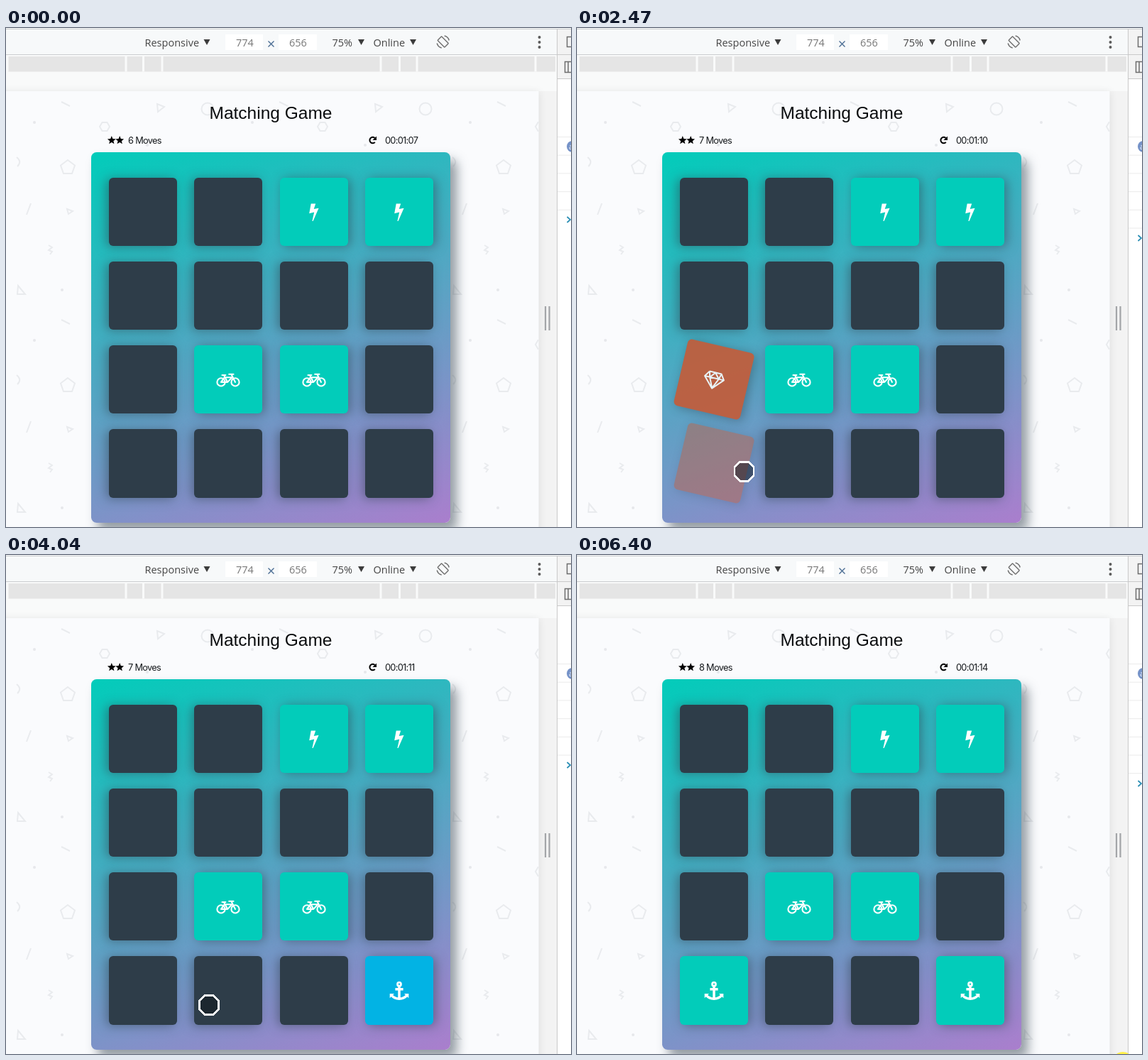
An HTML page for the animation above (6480 ms loop, 796 by 703 pixels).

```html
<!DOCTYPE html>
<html lang="en">
<head>
<meta charset="utf-8">
<title>Matching Game</title>
<style>
  html, body { margin: 0; width: 100%; height: 100%; overflow: hidden; background: #f9fafa; }
  #stage { position: relative; width: 796px; height: 703px; overflow: hidden; }
  svg { position: absolute; left: 0; top: 0; overflow: visible; }
  #stage > svg { overflow: hidden; }
  .ui { font: 14.5px "Open Sans", "Noto Sans", sans-serif; fill: #454545; }
  .ui .size { fill: #777; }
  .title { font: 24.5px "Liberation Sans", Arial, sans-serif; fill: #0a0c0e; }
  .score { font: 12.8px Inter, Roboto, sans-serif; letter-spacing: -.7px; fill: #15191c; }
  #deck {
    position: absolute; left: 120px; top: 175px; width: 506px; height: 521.5px; border-radius: 7.7px;
    background: linear-gradient(160deg, #02ccba 0%, #aa7ecd 100%);
    box-shadow: 9.2px 11.5px 15.3px rgba(46, 61, 73, .5);
  }
  /* Face-down cards are turned round, so their shadow falls to the left. */
  .card {
    position: absolute; width: 96.3px; height: 96.3px; border-radius: 6px;
    box-shadow: -3.8px 1.5px 15.3px rgba(46, 61, 73, .5);
  }
  .card.open { box-shadow: 3.8px 1.5px 15.3px rgba(46, 61, 73, .5); }
  .card svg { left: 48px; top: 49px; width: 1px; height: 1px; fill: none; stroke: #fff; display: none; }
  .card.open svg { display: block; }
</style>
</head>
<body>
<div id="stage">
  <svg width="796" height="703">
    <defs>
      <pattern id="doodles" x="0" y="89" width="307" height="307" patternUnits="userSpaceOnUse">
        <g fill="none" stroke="#e9ebee" stroke-width="2">
          <path d="M78 15L90 21M29 174L35 158M213 18L223 22L214 29ZM86 166L94 169L88 173ZM17 274L27 286L16 286ZM15 93Q23 99 16 106M60 217L65 220L60 224L65 226L62 230"/>
          <circle cx="284" cy="25" r="8.5"/>
          <path d="M135.5 44H142.5L146 50L142.5 56H135.5L132 50Z"/>
          <path d="M87 97L97 104.5L93 116H81L77 104.5Z"/>
        </g>
        <g fill="#e6e8eb">
          <circle cx="40" cy="44" r="2"/><circle cx="79" cy="280" r="2"/><circle cx="199" cy="76" r="2"/>
        </g>
      </pattern>
      <filter id="soft" x="-5%" y="-5%" width="110%" height="110%"><feGaussianBlur stdDeviation="6"/></filter>
    </defs>

    <rect x="750" y="89" width="27" height="614" fill="#f3f3f3"/>
    <rect x="-20" y="90" width="771" height="640" opacity=".09" filter="url(#soft)"/>
    <rect y="89" width="750.5" height="614" fill="#fafbfd"/>
    <rect y="89" width="750.5" height="614" fill="url(#doodles)"/>

    <rect width="796" height="38" fill="#f7f9fa"/>
    <path d="M0 1.5H796M0 37.5H776" stroke="#cbcdcf"/>
    <rect x="3" y="40" width="771" height="21.5" fill="#e5e5e5"/>
    <g id="ruler" fill="#f9fafa"></g>

    <path d="M309 9H362V31H309ZM384 9H438V31H384Z" fill="#fff"/>
    <g class="ui">
      <text x="195.5" y="25.5">Responsive</text>
      <text class="size" x="324" y="25.5">774</text>
      <text class="size" x="399" y="25.5">656</text>
      <text x="459.5" y="25.5">75%</text>
      <text x="517.5" y="25.5">Online</text>
    </g>
    <path d="M369.5 18.5L377.5 26.5M377.5 18.5L369.5 26.5" stroke="#4b6d94" stroke-width="1.4"/>
    <path d="M278.5 16H287.5L283 24ZM496 16H505L500.5 24ZM569 16H578L573.5 24Z" fill="#3c3c3c"/>
    <g fill="none" stroke="#6e6e6e" stroke-width="1.4" transform="translate(615.7 19.5)">
      <rect x="-4" y="-7" width="8" height="14" rx="1" transform="rotate(-45)"/>
      <path d="M2 -8.5A8.7 8.7 0 0 1 8.5 -2M-2 8.5A8.7 8.7 0 0 1 -8.5 2"/>
    </g>
    <path d="M751.5 13V27.1" stroke="#5c5c5c" stroke-width="4" stroke-linecap="round" stroke-dasharray="0 7"/>
    <path d="M760 392V426M765.5 392V426" stroke="#a3a5a8" stroke-width="2.2"/>

    <rect x="777" y="2" width="19" height="70" fill="#f3f3f3"/>
    <rect x="777" y="72" width="19" height="631" fill="#fff"/>
    <path d="M776.5 1V703M777 37.5H796M777 71.5H796" stroke="#c9c9c9"/>
    <path d="M797 12.5H790.5V26.5H797M797 47.5H787.5V62.5H797M792 47V63" fill="none" stroke="#6e6e6e" stroke-width="1.5"/>
    <path id="rows" stroke="#ebebeb"/>
    <circle cx="798" cy="167" r="8" fill="#7592c8"/>
    <text x="793" y="171" fill="#fff" font-family="Open Sans, sans-serif" font-size="10">a</text>
    <path id="prompt" d="M790.5 -4L795 0L790.5 4" fill="none" stroke="#2b8fb5" stroke-width="1.8"/>

    <text class="title" x="286.5" y="128">Matching Game</text>
    <g id="stars"></g>
    <text class="score" id="moves" x="172" y="162.5"></text>
    <text class="score" id="clock" x="534" y="162.5"></text>
    <path d="M519.8 160.8A4.2 4.2 0 1 1 519.5 155" fill="none" stroke="#000" stroke-width="2"/>
    <path d="M522 152.5V158H516.5Z"/>
  </svg>

  <div id="deck"></div>

  <svg width="796" height="703">
    <path id="cursor" d="M-6 -13.5H6L13.5 -6V6L6 13.5H-6L-13.5 6V-6Z" fill="#0a0f14" fill-opacity=".48" stroke="#fff" stroke-width="2.8" shape-rendering="crispEdges"/>
    <circle id="spot" cx="769" cy="715" r="15" fill="#fff04a"/>
  </svg>
</div>

<script>
const LOOP = 6480, STEP = 156;
const MISS = 2400, MATCH = 4690;
const DARK = '#2e3d49', BLUE = '#02b3e4', TEAL = '#02ccba', RUST = 'rgb(201,88,50)';

const ICONS = {
  bolt: '<path fill="#fff" stroke="none" d="M-4.3 -12.5H2.2L-.3 -4.9L6.6 -6.3L-1.4 12H-2.6L.2 -.4L-6.8 1.3Z"/>',
  bike: `<g stroke-width="2.1" stroke-linejoin="round" stroke-linecap="round">
    <circle cx="-10" cy="2.9" r="5.6"/><circle cx="10" cy="2.9" r="5.6"/>
    <path d="M-10 2.9L-5.3 -3.7H5.4L-.8 2.9ZM-.8 2.9L-6 -6.7M-8.5 -7H-3.6M10 2.9L4.3 -8.3H1.2M4.3 -8.3H7.5"/></g>`,
  gem: '<path stroke-width="2" stroke-linejoin="round" d="M-8.5 -10.7H8.5L13.8 -2.8L0 12L-13.8 -2.8H13.8M-8.5 -10.7L-13.8 -2.8M-8.5 -10.7L-6.5 -2.8L0 -10.5L6.5 -2.8L8.5 -10.7M-6.5 -2.8L0 11.5L6.5 -2.8"/>',
  anchor: `<circle cy="-9.3" r="2.5" stroke-width="2.7"/>
    <path stroke-width="3.5" d="M0 -7V11M-5.6 -2.2H5.6M-10.8 6.3Q-7 10.8 0 11.2Q7 10.8 10.8 6.3"/>
    <path fill="#fff" stroke="none" d="M-13.3 4H-7L-13.3 10.3ZM13.3 4H7L13.3 10.3Z"/>`
};
const FACES = { 2: 'bolt', 3: 'bolt', 8: 'gem', 9: 'bike', 10: 'bike', 12: 'anchor', 15: 'anchor' };

const $ = id => document.getElementById(id);
const repeat = (n, make) => Array.from({ length: n }, (_, i) => make(i));
const clamp = u => Math.max(0, Math.min(1, u));
const ease = u => u * u * (3 - 2 * u);
const mix = (a, b, u) => a + (b - a) * u;

// Where the pointer rests: arrival time, x, y.
const STOPS = [
  { t: 610, x: 330, y: 636 }, { t: 920, x: 202, y: 508 }, { t: 1250, x: 202, y: 508 },
  { t: 1800, x: 235.5, y: 624 }, { t: 2600, x: 235.5, y: 625 }, { t: 3270, x: 540.5, y: 620 },
  { t: 3740, x: 540.5, y: 620 }, { t: 4200, x: 208.5, y: 638 }, { t: 4990, x: 208.5, y: 645 },
  { t: 5460, x: 160.5, y: 651 }
];

function pointer(t) {
  const last = STOPS[STOPS.length - 1];
  const i = STOPS.findIndex(stop => stop.t > t);
  if (i < 1) return i ? last : STOPS[0];
  const a = STOPS[i - 1], b = STOPS[i], u = ease((t - a.t) / (b.t - a.t));
  return { x: mix(a.x, b.x, u), y: mix(a.y, b.y, u) };
}

// Fades in while the size swings past its rest value.
function bounce(color, t, start, length) {
  const u = clamp((t - start) / length);
  return { color, open: true, opacity: clamp(u / .6), scale: 1 + .2 * (1 - u) ** 2 * Math.sin(4 * Math.PI * u) };
}

function shake(t, fadeFrom) {
  const u = clamp((t - MISS) / 550);
  return {
    color: RUST, open: true,
    opacity: mix(fadeFrom, 1, clamp(u * 2.46)),
    rotate: 16 * (1 - u) * Math.sin(3 * Math.PI * u)
  };
}

function cardState(i, t) {
  const missed = t >= MISS && t < MISS + 550;
  if (i === 8 && missed) return shake(t, .77);
  if (i === 12 && missed) return shake(t, 0);
  if (i === 8 && t >= 870 && t < MISS) return bounce(BLUE, t, 870, 300);
  if (FACES[i] === 'anchor' && t >= MATCH) return bounce(TEAL, t, MATCH, 540);
  if (i === 15 && t >= 3680) return bounce(BLUE, t, 3680, 300);
  if (FACES[i] === 'bolt' || FACES[i] === 'bike') return { color: TEAL, open: true };
  return { color: DARK };
}

const cards = repeat(16, i => {
  const card = document.createElement('div');
  card.style.left = 24.6 + i % 4 * 120.5 + 'px';
  card.style.top = 35.5 + Math.floor(i / 4) * 118.25 + 'px';
  card.innerHTML = `<svg>${ICONS[FACES[i]] || ''}</svg>`;
  return $('deck').appendChild(card);
});

const gap = x => `<rect x="${x - 1.5}" y="40" width="3" height="21.5"/>`;
$('ruler').innerHTML = [154, 180.5, 205, 372].map(d => gap(374 - d) + gap(374 + d)).join('');

const star = cx => repeat(10, k => {
  const r = k % 2 ? 2.7 : 6.2, a = (k / 5 - .5) * Math.PI;
  return `${cx + r * Math.cos(a)},${158.3 + r * Math.sin(a)}`;
}).join(' ');
$('stars').innerHTML = [148.8, 160.2].map(x => `<polygon points="${star(x)}"/>`).join('');

const show = (id, visible) => { $(id).style.display = visible ? '' : 'none'; };

function render(now) {
  const t = Math.floor((now + 26) / STEP) * STEP;

  cards.forEach((card, i) => {
    const { color, open = false, scale = 1, opacity = 1, rotate = 0 } = cardState(i, t);
    card.className = open ? 'card open' : 'card';
    card.style.background = color;
    card.style.opacity = opacity;
    card.style.transform = scale !== 1 || rotate ? `rotate(${rotate}deg) scale(${scale})` : 'none';
    card.firstChild.style.visibility = opacity < .5 ? 'hidden' : '';
  });

  const turns = (t >= MISS) + (t >= MATCH);
  const seconds = 8 + Math.floor((t - 150) / 1000);
  $('moves').textContent = `${6 + turns} Moves`;
  $('clock').textContent = '00:01:' + String(seconds).padStart(2, '0');
  $('rows').setAttribute('d', repeat(5 + turns, k => `M777 ${153.5 + k * 25.7}H796`).join(''));
  $('prompt').setAttribute('transform', `translate(0 ${270 + 26 * turns})`);

  const { x, y } = pointer(t);
  $('cursor').setAttribute('transform', `translate(${x} ${y})`);
  show('cursor', t >= 610 && t < 6200);
  show('spot', t >= 6390);
}

const begin = performance.now();
function loop() {
  render((performance.now() - begin) % LOOP);
  requestAnimationFrame(loop);
}
loop();
</script>
</body>
</html>
```
